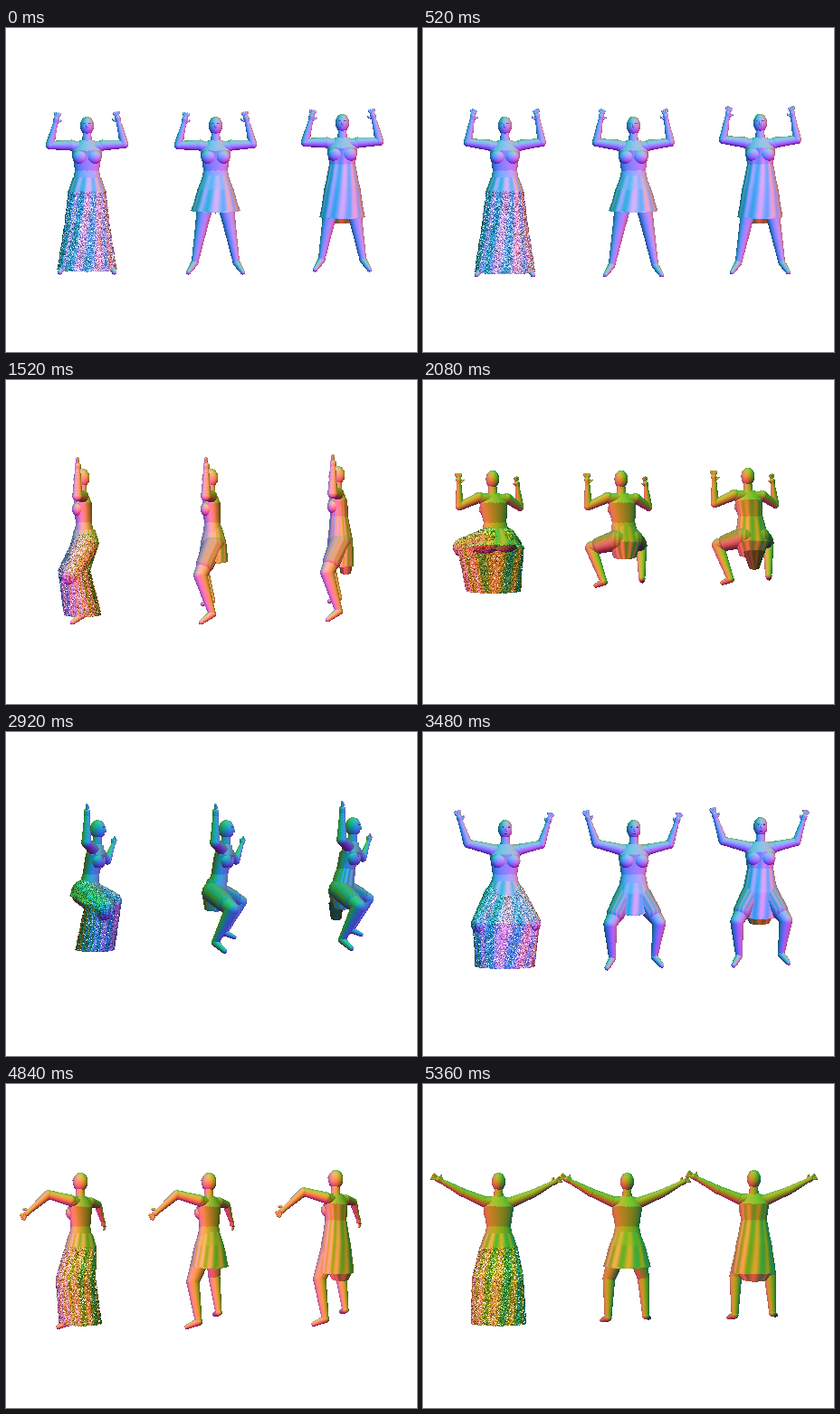
Recreate the animation shown at these times as an HTML page with a canvas. Size 454 by 358 pixels, loop 5.4 s.

```html
<!DOCTYPE html>
<html>
<head>
<meta charset="utf-8">
<style>
html, body { margin: 0; width: 100%; height: 100%; overflow: hidden; background: #fff; }
canvas { display: block; }
</style>
</head>
<body>
<canvas id="stage" width="454" height="358"></canvas>
<script>
const W = 454, H = 358, LOOP = 5400, STEP = 40, RAD = Math.PI / 180;
const EYE_Y = 150, CAMERA = 300, THIGH = 36, SHIN = 42;
const ctx = document.getElementById('stage').getContext('2d');
const img = ctx.createImageData(W, H), px = img.data, depth = new Float32Array(W * H);

// time, yaw, centre x, ankle y, then azimuth / upper / forearm elevation per arm, stance
const KEYS = [
  [0, 0, 231, 259, 0, 0, 104, 0, 3, 104, 23],
  [560, 0, 232, 262, 0, 8, 100, 0, 8, 100, 24],
  [1000, 3, 232, 231, 0, -5, 108, 0, -3, 95, 25],
  [1400, 75, 230, 256, 10, 0, 95, 10, 0, 95, 22],
  [2080, 158, 223, 222, 20, -25, 100, 20, -25, 88, 23],
  [2920, 284, 230, 226, 0, 8, 95, 20, -30, 55, 22],
  [3360, 338, 231, 240, 0, 0, 85, 0, 0, 85, 24],
  [3680, 378, 233, 262, 0, 35, 50, 0, 35, 50, 22],
  [4040, 420, 230, 260, 0, -75, -78, 0, -75, -70, 20],
  [4580, 462, 226, 260, 0, 60, 80, 0, 60, 80, 18],
  [4840, 488, 224, 257, 10, -5, -55, 42, 14, -42, 18],
  [5360, 532, 225, 257, 0, 22, 28, 0, 22, 28, 21]
];

const lerp = (a, b, u) => a + (b - a) * u;
const mix = (p, q, u) => p.map((v, i) => lerp(v, q[i], u));
const add = (p, q, m = 1) => p.map((v, i) => v + q[i] * m);
const dot = (p, q) => p[0] * q[0] + p[1] * q[1] + p[2] * q[2];
const dist = (p, q) => Math.hypot(...add(q, p, -1));
const clamp = (v, a, b) => Math.max(a, Math.min(b, v));

function hash(x, y, n) {
  const v = Math.sin(x * 12.99 + y * 78.23 + n * 37.7) * 43758.55;
  return v - Math.floor(v);
}

function poseAt(t) {
  let i = 0;
  while (i < KEYS.length - 2 && KEYS[i + 1][0] <= t) i++;
  const a = KEYS[i], b = KEYS[i + 1];
  return mix(a, b, clamp((t - a[0]) / (b[0] - a[0]), 0, 1));
}

let cos, sin, originX, originY, tick;

// The surface normal, seen from the body, gives the colour
function paint(o, x, y, nx, ny, nz, style) {
  let bx = nx * cos + nz * sin, by = -ny, bz = nz * cos - nx * sin;
  if (style.fold) {
    const around = Math.atan2(bx, bz);
    const turn = style.fold * Math.sin(around * 13 + y * 0.04);
    const c = Math.cos(turn), s = Math.sin(turn);
    [bx, bz] = [bx * c + bz * s, bz * c - bx * s];
  }
  if (style.inside) bz = -Math.abs(bz);
  let light = (style.light || 1) * (0.55 + 0.52 * nz);
  if (style.noise) {
    const j = hash(y, x, tick) - 0.5, k = hash(x + 9, y, tick) - 0.5;
    bx += j * style.noise;
    bz += k * style.noise;
    light *= 0.95 + (j + k) * 0.6;
  }
  px[o * 4] = (140 + 120 * bx) * light;
  px[o * 4 + 1] = (137 + 112 * by) * light;
  px[o * 4 + 2] = (140 + 115 * bz) * light;
}

// Ellipsoid aligned with the body; a given slope replaces its vertical normal
function blob(p, rx, ry, rz, style = {}) {
  const cz = p[2] * cos + p[0] * sin, zoom = 1 / (1 - cz / CAMERA);
  const cx = originX + (p[0] * cos - p[2] * sin) * zoom;
  const cy = originY + EYE_Y + (p[1] - EYE_Y) * zoom;
  rx *= zoom;
  ry *= zoom;
  rz *= zoom;
  const r = Math.max(rx, rz), slope = style.slope;
  const ix = 1 / (rx * rx), iy = 1 / (ry * ry), iz = 1 / (rz * rz);
  const A = sin * sin * ix + cos * cos * iz, E = cos * cos * ix + sin * sin * iz;
  const K = cos * sin * (ix - iz);
  for (let y = Math.max(0, Math.ceil(cy - ry)); y <= Math.min(H - 1, cy + ry); y++) {
    for (let x = Math.max(0, Math.ceil(cx - r)); x <= Math.min(W - 1, cx + r); x++) {
      const dx = x - cx, dy = y - cy, B = dx * K;
      const D = B * B - A * (dx * dx * E + dy * dy * iy - 1);
      if (D < 0) continue;
      const dz = (Math.sqrt(D) - B) / A, o = y * W + x;
      if (cz + dz <= depth[o]) continue;
      if (style.holes && hash(x, y, tick) < style.holes) continue;
      depth[o] = cz + dz;
      const nx = dx * E + dz * K, nz = dz * A + B;
      const ny = slope === undefined ? dy * iy : -slope * Math.hypot(nx, nz);
      const n = Math.hypot(nx, ny, nz);
      paint(o, x, y, nx / n, ny / n, nz / n, style);
    }
  }
}

function limb(p, q, r0, r1, style) {
  const n = Math.ceil(dist(p, q) / 0.7) + 1;
  for (let i = 0; i <= n; i++) {
    const r = lerp(r0, r1, i / n);
    blob(mix(p, q, i / n), r, r, r, style);
  }
}

// Stack of flat ellipses; each end is [point, half width, half depth]
function tube(a, b, style = {}) {
  const slope = clamp((b[1] - a[1]) / (b[0][1] - a[0][1]), -0.8, 0.8);
  const n = Math.ceil(dist(a[0], b[0]) / 1.1) + 1;
  for (let i = 0; i <= n; i++) {
    const u = i / n;
    blob(mix(a[0], b[0], u), lerp(a[1], b[1], u), 3, lerp(a[2], b[2], u), { ...style, slope });
  }
}

function arm(side, az, up, fore, lean) {
  const dir = e => [
    side * Math.cos(e * RAD) * Math.cos(az * RAD),
    -Math.sin(e * RAD),
    Math.cos(e * RAD) * Math.sin(az * RAD)
  ];
  const shoulder = [side * 17, 129, lean * 0.8];
  const elbow = add(shoulder, dir(up), 24), wrist = add(elbow, dir(fore), 24.5);
  const palm = add(wrist, dir(fore), 5);
  limb(shoulder, elbow, 6, 4.6);
  limb(elbow, wrist, 4.8, 2.8);
  limb(wrist, palm, 2.6, 3.2);
  for (const spread of [-26, -9, 9, 26]) limb(palm, add(palm, dir(fore + spread), 7), 1.5, 1.1);
  limb(wrist, add(wrist, dir(fore + 48), 7), 1.5, 1.1);
}

function legJoints(side, stance, ankleY, squat) {
  const hip = [side * 9, 182 - 6 * squat, 0], ankle = [side * stance, ankleY, 6 * squat];
  const d = add(ankle, hip, -1), D = Math.hypot(...d), unit = d.map(v => v / D);
  const raw = [side * 0.75, -0.3, 1], pole = add(raw, unit, -dot(raw, unit));
  const along = (THIGH ** 2 - SHIN ** 2 + D * D) / (2 * D);
  const bend = Math.sqrt(Math.max(0, THIGH ** 2 - along ** 2)) / Math.hypot(...pole);
  return { side, hip, ankle, knee: add(add(hip, unit, along), pole, bend) };
}

function torso(lean) {
  const at = (y, w, d) => [[0, y, lean * clamp((182 - y) / 60, 0, 1)], w, d];
  const rings = [at(126, 11, 7), at(135, 17, 10), at(157, 13.5, 9), at(179, 18, 12), at(185, 15, 11)];
  for (let i = 1; i < rings.length; i++) tube(rings[i - 1], rings[i]);
  limb([-15, 130, lean * 0.8], [15, 130, lean * 0.8], 6, 6);
  for (const s of [-1, 1]) blob([s * 7.5, 142, lean * 0.65 + 5], 8.5, 8, 7);
  limb([0, 114, lean], [0, 126, lean * 0.9], 4.6, 5.5);
  blob([0, 107.5, lean], 7.6, 10.3, 8.6);
  blob([0, 109, lean + 8], 1.4, 2.6, 2);
  for (const s of [-1, 1]) blob([s * 3, 106, lean + 7], 1.6, 0.9, 1.4, { light: 0.65 });
  blob([0, 113, lean + 7], 2.2, 0.7, 1.3, { light: 0.75 });
}

function longSkirt(legs, squat) {
  const style = { fold: 0.7, noise: 0.6, holes: lerp(0.08, 0.03, squat) };
  const [l, r] = legs, span = j => Math.abs(l[j][0] - r[j][0]) / 2;
  const hips = [[0, 180, 0], lerp(21, 26, squat), lerp(15, 18, squat)];
  const kneeMid = mix(l.knee, r.knee, 0.5);
  const knee = [add(kneeMid, [0, 0, -6 * squat]), span('knee') + 10, 18];
  const hem = [add(mix(l.ankle, r.ankle, 0.5), [0, lerp(7, 13, squat), 4 * squat]), span('ankle') + 10, 21];
  tube([[0, 166, 2 * squat], 16, 12], hips, { fold: 0.6 });
  tube(hips, knee, style);
  tube(knee, hem, style);
  if (squat > 0.2) for (const leg of legs) limb(leg.hip, leg.knee, 14, 11, { fold: 0.4, noise: 0.4 });
}

function shortSkirt(squat) {
  const hips = [[0, 178, 0], lerp(20, 18, squat), 14];
  const hem = [[0, lerp(201, 195, squat), 2 * squat], lerp(27, 13, squat), lerp(18, 13, squat)];
  tube([[0, 163, 2 * squat], 14, 10], hips, { fold: 0.3 });
  tube(hips, hem, { fold: 0.6 });
}

function dress(squat, lean) {
  const waist = [[0, 153, lean * 0.4], 14.5, 10], hips = [[0, 180, 0], 20, 14];
  const hem = [[0, lerp(211, 196, squat), 2 * squat], lerp(25, 14, squat), lerp(17, 12, squat)];
  tube([[0, 136, lean * 0.7], 16.5, 10.5], waist, { fold: 0.35 });
  tube(waist, hips, { fold: 0.55 });
  tube(hips, hem, { fold: 0.55 });
  tube([[0, lerp(208, 192, squat), -6], lerp(20, 12, squat), 8],
    [[0, lerp(217, 208, squat), -6], lerp(14, 6, squat), 6],
    { inside: true, fold: 0.5, light: lerp(1.15, 0.6, squat) });
}

function figure(kind, pose) {
  const [, yaw, x, ankleY, azL, upL, foreL, azR, upR, foreR, stance] = pose;
  const squat = clamp((258 - ankleY) / 30, 0, 1), lean = 13 * squat;
  cos = Math.cos(yaw * RAD);
  sin = Math.sin(yaw * RAD);
  originX = x + [-142, 0, 140][kind];
  originY = [0, 0, -3][kind];
  torso(lean);
  arm(-1, azL, upL, foreL, lean);
  arm(1, azR, upR, foreR, lean);
  const legs = [-1, 1].map(s => legJoints(s, stance, ankleY, squat));
  for (const { side, hip, knee, ankle } of legs) {
    if (kind) {
      limb(hip, knee, 10.5, 7);
      limb(knee, ankle, 7, 3.8);
      if (squat > 0.2) limb(hip, mix(hip, knee, 0.65), 11.5, 9.5, { fold: 0.4, light: 0.9 });
    }
    if (kind || squat < 0.3) limb(ankle, add(ankle, [side * 6, 6, 11]), 4, 2.6);
  }
  if (kind === 0) longSkirt(legs, squat);
  else if (kind === 1) shortSkirt(squat);
  else dress(squat, lean);
}

function draw() {
  const now = Math.floor(performance.now() / STEP) * STEP % LOOP;
  if (now !== draw.last) {
    draw.last = now;
    tick = now / STEP;
    px.fill(255);
    depth.fill(-1e4);
    const pose = poseAt(now);
    for (let kind = 0; kind < 3; kind++) figure(kind, pose);
    ctx.putImageData(img, 0, 0);
  }
  requestAnimationFrame(draw);
}
draw();
</script>
</body>
</html>
```
